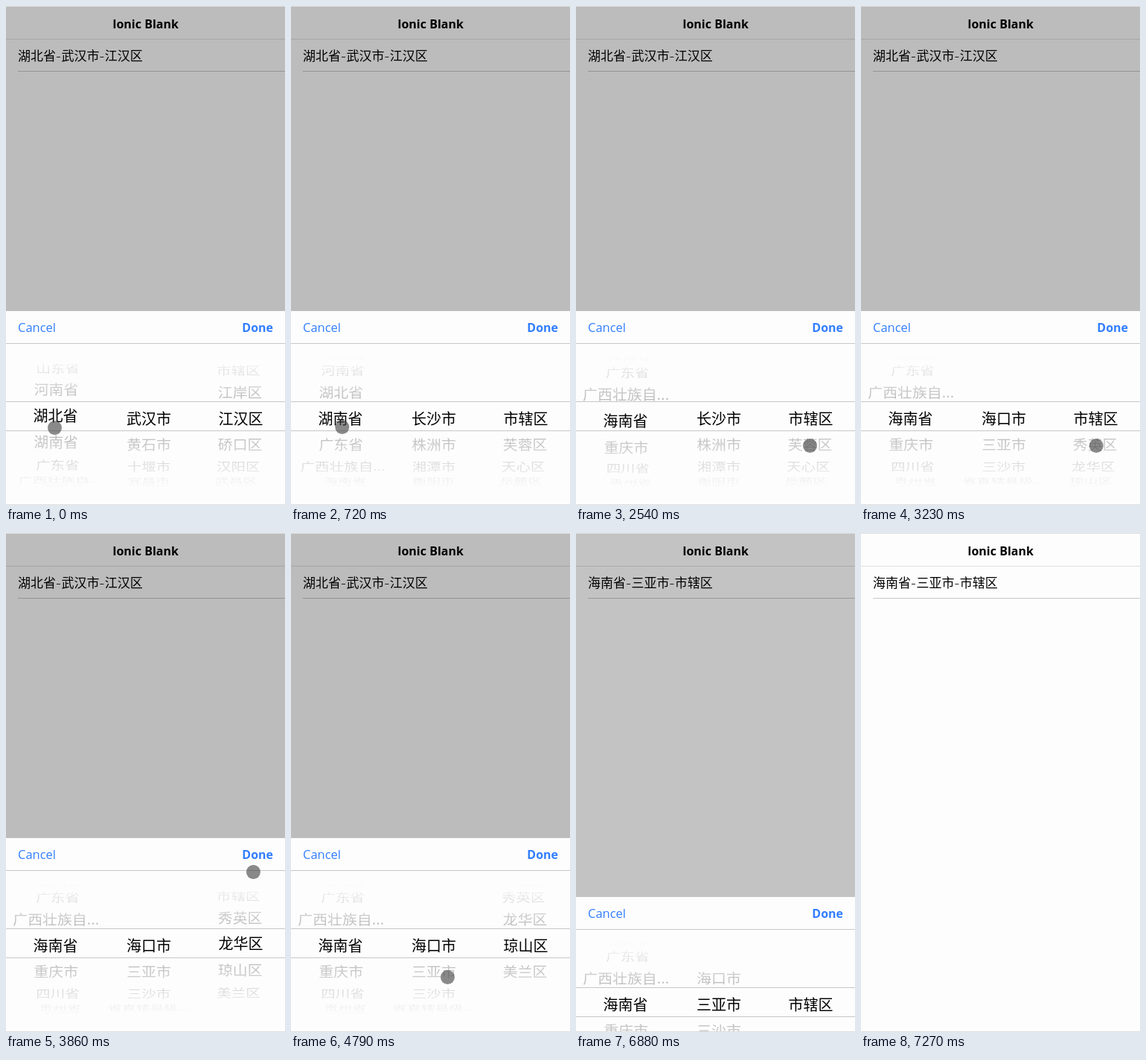
An HTML page with a canvas for the animation above (9400 ms loop, 375x669 px).

```html
<!DOCTYPE html>
<html lang="zh-CN">
<head>
<meta charset="utf-8">
<title>Region picker</title>
<style>
html, body { margin: 0; height: 100%; overflow: hidden; background: #fdfdfd; }
canvas { display: block; }
</style>
</head>
<body>
<canvas id="stage" width="375" height="669"></canvas>
<script>
const ctx = document.getElementById('stage').getContext('2d');
const LOOP = 9400, DONE = 6880, PAPER = '#fdfdfd', RULE = '#c8c7cc', BLUE = '#327eff';
const CJK = '"Noto Sans CJK SC", sans-serif';
const LATIN = '"Open Sans", "Noto Sans", sans-serif';

const words = list => list.split(' ');
const provinces = words('福建省 江西省 山东省 河南省 湖北省 湖南省 广东省 广西壮族自... 海南省 重庆市 四川省 贵州省 云南省');
const HUBEI = provinces.indexOf('湖北省');
const cities = [
  '武汉市 黄石市 十堰市 宜昌市 襄阳市',
  '长沙市 株洲市 湘潭市 衡阳市 邵阳市',
  '海口市 三亚市 三沙市 省直辖县级...'
].map(words);
const districts = [
  '市辖区 江岸区 江汉区 硚口区 汉阳区 武昌区 青山区',
  '市辖区 芙蓉区 天心区 岳麓区 开福区',
  '市辖区 秀英区 龙华区 琼山区 美兰区',
  '市辖区'
].map(words);
const listSwaps = [570, 2960, 5745];

// Bursts of movement, each shown in equal steps: from, to, steps
const bursts = [[0, 990, 7], [1260, 4790, 26], [5070, 6580, 11], [DONE, 7270, 3]];

// Where the pointer turns: time, x, y
const pointerStops = [[0, 65, 565], [350, 67, 538], [1150, 70, 600], [1396, 72, 561], [2482, 314, 589],
  [3380, 316, 589], [3840, 332, 454], [4790, 210, 595], [5450, 204, 547], [5893, 204, 555], [6580, 337, 430]];

function snap(time) {
  const [from, to, steps] = bursts.filter(b => b[0] <= time).pop();
  const step = Math.min(steps, Math.floor((time - from) / (to - from) * steps + .2));
  return from + step * (to - from) / steps;
}

const progress = (t, from, to) => Math.min(1, Math.max(0, (t - from) / (to - from)));

function ease(t, from, to) {
  const u = progress(t, from, to);
  return u * u * (3 - 2 * u);
}

function pointerAt(t) {
  const next = Math.max(1, pointerStops.findIndex(stop => stop[0] > t));
  const done = t >= pointerStops[pointerStops.length - 1][0];
  const i = done ? pointerStops.length - 1 : next;
  const [t0, x0, y0] = pointerStops[i - 1], [t1, x1, y1] = pointerStops[i];
  const u = ease(t, t0, t1);
  return [x0 + (x1 - x0) * u, y0 + (y1 - y0) * u];
}

function box(x, y, w, h, fill) {
  ctx.fillStyle = fill;
  ctx.fillRect(x, y, w, h);
}

function text(str, x, y, font, { color = '#000', align = 'left', baseline = 'alphabetic' } = {}) {
  ctx.font = font;
  ctx.fillStyle = color;
  ctx.textAlign = align;
  ctx.textBaseline = baseline;
  ctx.fillText(str, x, y);
}

function drawPage(parts) {
  box(0, 0, 375, 669, PAPER);
  text('Ionic Blank', 187.5, 30, 'bold 16px ' + LATIN, { align: 'center' });
  box(0, 44, 375, 1, '#dedede');
  parts.forEach((part, i) => {
    const x = 16 + 58.4 * i;
    text(part, x, 67, '300 17px ' + CJK, { baseline: 'middle' });
    if (i < 2) box(x + 52, 68, 5, 1, '#222');
  });
  box(16, 87, 359, 1, RULE);
}

// A wheel of radius 90 seen with a perspective of 1000
function drawWheel(items, position, centerX) {
  items.forEach((label, i) => {
    const angle = (i - position) * 21 * Math.PI / 180;
    if (Math.abs(angle) >= Math.PI / 2) return;
    const depth = 1000 / (1000 - 90 * Math.cos(angle)), scale = depth * .91;
    ctx.save();
    ctx.translate(188 + (centerX - 188) * scale, 553 + 90 * Math.sin(angle) * depth);
    ctx.scale(scale, scale * Math.cos(angle));
    text(label, 0, 0, '300 20px ' + CJK, { align: 'center', baseline: 'middle' });
    ctx.restore();
  });
}

function drawFade(solidY, clearY, top, height) {
  const fade = ctx.createLinearGradient(0, solidY, 0, clearY);
  fade.addColorStop(0, 'rgba(253,253,253,1)');
  fade.addColorStop(1, 'rgba(253,253,253,.73)');
  box(0, top, 375, height, fade);
}

function drawPicker(t, slide) {
  const swaps = listSwaps.filter(s => t >= s).length;
  const province = ease(t, -110, 440) + ease(t, 1150, 1400) + 2 * ease(t, 1500, 2640);
  const city = ease(t, 5070, 5650);
  const district = [2, 0, 3 * ease(t, 3380, 4113), 0][swaps];

  ctx.save();
  ctx.translate(0, Math.round(260 * slide));
  box(0, 409, 375, 260, PAPER);
  drawWheel(provinces, HUBEI + province, 66.5);
  drawWheel(cities[Math.min(swaps, 2)], city, 192);
  drawWheel(districts[swaps], district, 315.5);
  drawFade(469, 531, 453, 78);
  drawFade(651, 569, 569, 100);
  for (const y of [452, 530, 569]) box(0, y, 375, 1, RULE);
  text('Cancel', 16, 437, '16.5px ' + LATIN, { color: BLUE });
  text('Done', 359, 437, 'bold 16px ' + LATIN, { color: BLUE, align: 'right' });
  ctx.restore();
}

function drawPointer(t) {
  const [x, y] = pointerAt(t);
  ctx.beginPath();
  ctx.arc(x + .5, y + .5, 9.5, 0, Math.PI * 2);
  ctx.fillStyle = 'rgba(60,60,60,.6)';
  ctx.fill();
}

function render(time) {
  const t = snap(time % LOOP), done = t >= DONE;
  const closing = progress(t, 6830, 7270);

  drawPage(words(done ? '海南省 三亚市 市辖区' : '湖北省 武汉市 江汉区'));
  if (closing < 1) {
    box(0, 1, 375, 667, `rgba(0,0,0,${.26 * (1 - closing)})`);
    drawPicker(t, 1 - (1 - closing) ** 3);
  }
  if (!done) drawPointer(t);
  for (const y of [0, 668]) box(0, y, 375, 1, '#dedede');
}

const start = performance.now();
(function loop() {
  render(performance.now() - start);
  requestAnimationFrame(loop);
})();
</script>
</body>
</html>
```
